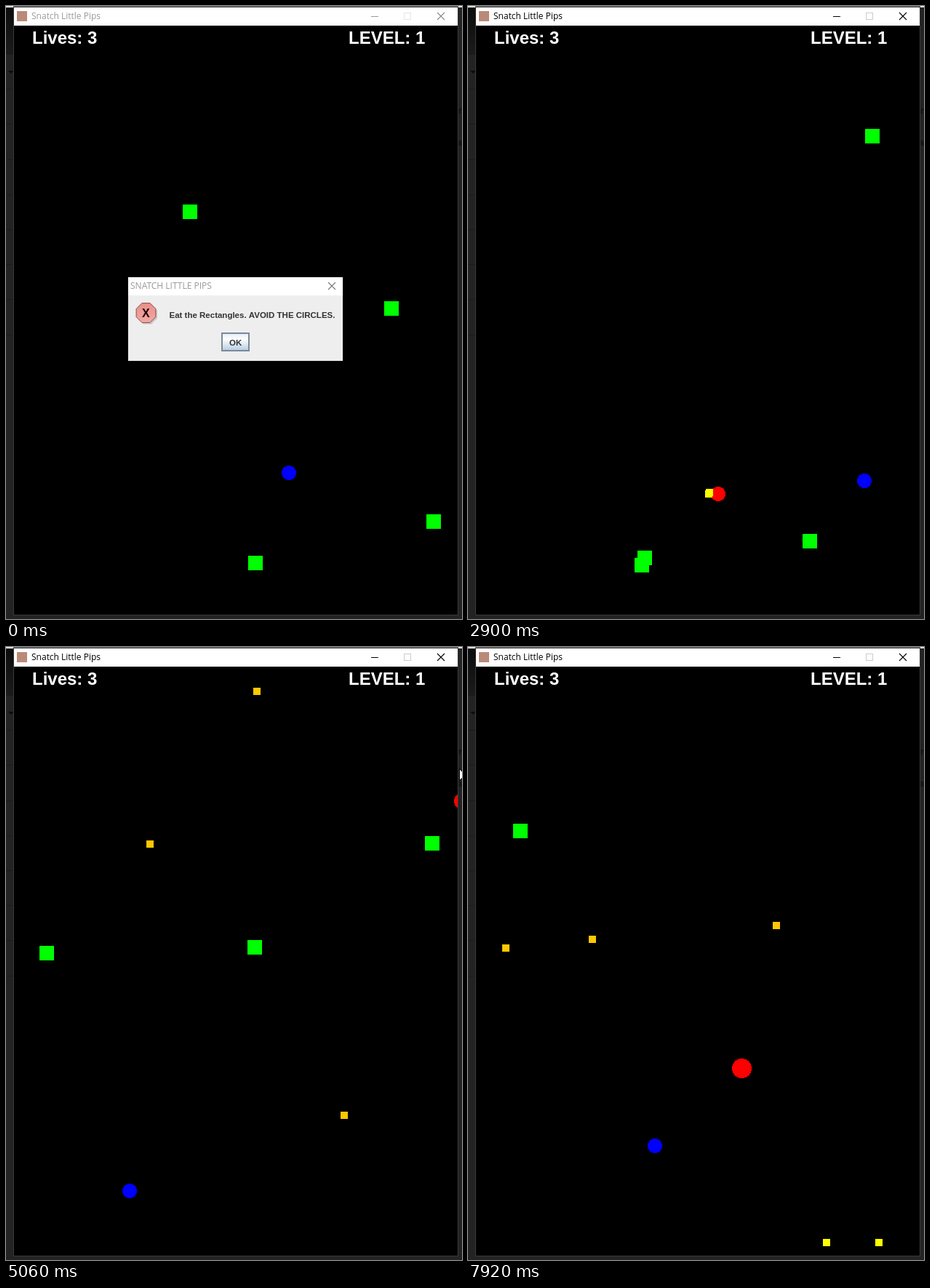
An HTML page with a canvas for the animation above (7990 ms loop, 627x843 px).

```html
<!DOCTYPE html>
<html>
<head>
<meta charset="utf-8">
<title>Snatch Little Pips</title>
<style>
html, body { margin: 0; width: 100%; height: 100%; overflow: hidden; background: #222; }
canvas { display: block; }
</style>
</head>
<body>
<canvas id="stage" width="627" height="843"></canvas>
<script>
const LOOP = 7990, STEP = 77.57, START = 21;
const TITLE = 'Snatch Little Pips';
const UI = '12px "Open Sans", sans-serif';
const BOLD = '"Liberation Sans", Arial, sans-serif';
const stage = document.getElementById('stage').getContext('2d');

// Key poses fall on shared beats; each eaten green bursts into two bits at the player.
const BEATS = [24, 37, 48, 65, 76, 102];
const EATEN = [36, 47, 69, 88];

function keys(poses, first = 0) {
  return poses.map((p, i) => [BEATS[first + i], ...p]);
}
function along(path, n) {
  let i = 0;
  while (i < path.length - 2 && n >= path[i + 1][0]) i++;
  const [a, b] = [path[i], path[i + 1]];
  const u = (n - a[0]) / (b[0] - a[0]);
  return [a[1] + (b[1] - a[1]) * u, a[2] + (b[2] - a[2]) * u];
}
const mod = (a, b) => ((a % b) + b) % b;

// Keeps one heading per axis: a key lying behind is reached by way of the wall ahead.
function unfold(values, lo, hi) {
  const dir = Math.sign(values[1] - values[0]) || 1, period = 2 * (hi - lo);
  let at = values[0];
  return values.map(v => {
    const ahead = goal => mod((goal - at) * dir, period);
    return at += dir * Math.min(ahead(v), ahead(2 * lo - v));
  });
}
function fold(v, lo, hi) {
  const u = mod(v - lo, 2 * (hi - lo));
  return lo + Math.min(u, 2 * (hi - lo) - u);
}
function bouncer(path, r, born = START, end = Infinity) {
  const xs = unfold(path.map(k => k[1]), 11 + r, 621 - r);
  const ys = unfold(path.map(k => k[2]), 27 + r, 837 - r);
  const line = path.map((k, i) => [k[0], xs[i], ys[i]]);
  return {
    r, born,
    alive: n => n >= born && n < end,
    at(n) {
      const [x, y] = along(line, n);
      return [fold(x, 11 + r, 621 - r), fold(y, 27 + r, 837 - r)];
    }
  };
}

const playerPath = keys([[326.5, 481.5], [343.5, 671], [543.5, 406.5], [627, 212], [104.5, 136.5], [376, 579]]);
const player = n => along(playerPath, Math.max(n, BEATS[0]));
const meal = i => [EATEN[i], ...player(EATEN[i])];

const ball = bouncer(keys([[538.5, 387.5], [544.5, 652.5], [397.5, 113.5], [169.5, 747.5], [22.5, 355.5], [256.5, 685.5]]), 10);
const greens = [
  [[354, 495]],
  [[580, 537], [556, 179]],
  [[473, 817], [470, 736], [360, 417], [586, 270]],
  [[275, 498], [243, 759], [227, 717], [342, 413], [147, 197]],
  [[459, 585], [239, 769], [130, 650], [56, 421], [139, 217], [72, 253]]
].map((poses, i) => i < EATEN.length
  ? bouncer([...keys(poses), meal(i)], 10, START, EATEN[i])
  : bouncer(keys(poses), 10));
const bits = [
  [[331, 671], [527, 609], [465, 644], [318, 791]],
  [[332, 669], [577, 727]],
  [[577, 409], [345, 61], [113, 87]],
  [[563, 416], [198, 271], [100, 404], [52, 414]],
  [[522, 493], [424, 383]],
  [[292, 278], [171, 402]],
  [[493, 819]],
  [[565, 819]]
].map((poses, i) => {
  const spawn = meal(i >> 1), first = BEATS.findIndex(b => b > spawn[0]);
  return bouncer([spawn, ...keys(poses, first)], 5, spawn[0], BEATS[first + poses.length - 1] + 10);
});

function rect(c, color, x, y, w, h) {
  c.fillStyle = color;
  c.fillRect(x, y, w, h);
}
function text(c, s, x, y, font, color) {
  c.font = font;
  c.fillStyle = color;
  c.fillText(s, x, y);
}
function square(color, [x, y], r) {
  rect(stage, color, Math.round(x) - r, Math.round(y) - r, 2 * r, 2 * r);
}
// Hard-edged disc, one pixel row at a time.
function disc(color, [x, y], r) {
  const left = Math.round(x - r), top = Math.round(y - r);
  for (let row = 0; row < 2 * r; row++) {
    const inset = Math.round(r - Math.sqrt(r * r - (row + 0.5 - r) ** 2));
    rect(stage, color, left + inset, top + row, 2 * (r - inset), 1);
  }
}
function shape(c, points) {
  c.beginPath();
  points.forEach(p => c.lineTo(...p));
  c.closePath();
}
function cross(c, x, y, color) {
  c.strokeStyle = color;
  c.lineWidth = 1.1;
  c.beginPath();
  c.moveTo(x, y); c.lineTo(x + 10, y + 10);
  c.moveTo(x + 10, y); c.lineTo(x, y + 10);
  c.stroke();
}
function octagon(c, x, y, r) {
  shape(c, Array.from({ length: 8 }, (_, i) => {
    const a = (i + 0.5) * Math.PI / 4;
    return [x + r * Math.cos(a), y + r * Math.sin(a)];
  }));
}
function fade(c, y0, y1, ...colors) {
  const g = c.createLinearGradient(0, y0, 0, y1);
  colors.forEach((color, i) => g.addColorStop(i / (colors.length - 1), color));
  return g;
}

function makeDialog() {
  const cv = document.createElement('canvas');
  cv.width = 297;
  cv.height = 117;
  const c = cv.getContext('2d');
  c.translate(-167, -372);
  rect(c, '#111', 167, 372, 297, 117);
  rect(c, '#eee', 168, 373, 295, 115);
  rect(c, '#fff', 168, 373, 295, 25);
  text(c, TITLE.toUpperCase(), 171, 389, UI, '#999');
  cross(c, 443, 380, '#777');
  c.fillStyle = '#c8c8c8';
  octagon(c, 194.5, 424, 14.5);
  c.fill();
  c.fillStyle = fade(c, 408, 436, '#e88e8a', '#f2aaa5');
  c.strokeStyle = '#8c4b48';
  c.lineWidth = 1;
  octagon(c, 192.5, 422, 14.5);
  c.fill();
  c.stroke();
  text(c, 'X', 187, 427.5, 'bold 16px ' + BOLD, '#200');
  text(c, 'Eat the Rectangles. AVOID THE CIRCLES.', 224.5, 429, 'bold 11.5px ' + BOLD, '#333');
  rect(c, '#7a8a99', 296, 449, 39, 26);
  rect(c, fade(c, 451, 473, '#e6eef6', '#fff', '#dbe6f1', '#b8cfe5'), 298, 451, 35, 22);
  text(c, 'OK', 307, 467, 'bold 11.5px ' + BOLD, '#333');
  return cv;
}
const dialog = makeDialog();

function drawDesktop() {
  rect(stage, '#232323', 0, 0, 627, 843);
  rect(stage, fade(stage, 3, 66, '#0c0c0c', '#1b1b1b'), 0, 3, 10, 63);
  for (let y = 66; y < 460; y += 48.2) rect(stage, '#1b1b1b', 0, Math.round(y), 10, 1);
  stage.fillStyle = '#0c0c0c';
  shape(stage, [[3, 89], [11, 89], [7, 93]]);
  stage.fill();
  text(stage, 'r', 622, 148, 'bold 13px ' + BOLD, '#111');
  text(stage, 'a', 620, 192, 'bold 13px ' + BOLD, '#111');
  rect(stage, '#ddd', 0, 0, 627, 2);
  rect(stage, '#777', 10, 0, 612, 1);
  rect(stage, '#3a3a3a', 10, 1, 612, 837);
  rect(stage, '#000', 11, 27, 610, 810);
}

function drawGame(n) {
  stage.save();
  stage.beginPath();
  stage.rect(11, 27, 610, 810);
  stage.clip();
  if (n < START) {
    for (const p of [[253, 283], [530, 416], [588, 709], [343, 766]]) square('#0f0', p, 10);
    disc('#00f', [388.5, 641.5], 10);
  } else {
    const meals = EATEN.filter(e => n >= e).length;
    for (const g of greens) if (g.alive(n)) square('#0f0', g.at(n), g.r);
    disc('#00f', ball.at(n), ball.r);
    disc('#f00', player(n), 10 + Math.round(meals * meals * 0.44) / 2);
    for (const b of bits) if (b.alive(n)) square(n - b.born < 16 ? '#ff0' : '#ffc800', b.at(n), b.r);
  }
  stage.restore();
  text(stage, 'Lives: 3', 36, 52, 'bold 24px ' + BOLD, '#fff');
  text(stage, 'LEVEL: 1', 471, 52, 'bold 24px ' + BOLD, '#fff');
}

function drawTitleBar(active) {
  const ink = active ? '#000' : '#999';
  rect(stage, '#fff', 11, 2, 610, 25);
  rect(stage, '#b98a78', 15, 7, 14, 14);
  text(stage, TITLE, 35, 18, UI, ink);
  rect(stage, ink, 502, 14, 10, 1);
  stage.strokeStyle = active ? '#ccc' : '#e6e6e6';
  stage.lineWidth = 1;
  stage.strokeRect(547.5, 9.5, 9, 9);
  cross(stage, 593, 9, active ? '#000' : '#888');
}

function drawDialog(n) {
  const p = Math.max(0, (n - START) * 0.3);
  if (p >= 1) return;
  const s = 1 - 0.048 * p, w = 297 * s, h = 117 * s;
  stage.globalAlpha = 1 - p;
  stage.drawImage(dialog, 315.5 - p - w / 2, 430.5 - p - h / 2, w, h);
  stage.globalAlpha = 1;
}

function drawCursor(x, y) {
  stage.save();
  stage.translate(Math.round(x) + 0.5, Math.round(y) + 0.5);
  shape(stage, [[0, 0], [0, 16], [4, 12.5], [7, 18], [9, 17], [6.5, 11.5], [11, 11.5]]);
  stage.fillStyle = '#fff';
  stage.strokeStyle = '#000';
  stage.lineWidth = 1;
  stage.fill();
  stage.stroke();
  stage.restore();
}

function draw(now) {
  const n = Math.max(0, Math.floor((now % LOOP - 6) / STEP));
  drawDesktop();
  drawGame(n);
  drawTitleBar(n >= START);
  drawDialog(n);
  if (n > 0 && n < START) {
    const left = (1 - Math.min(1, (n - 1) / 10)) ** 1.5;
    drawCursor(316 + 156 * left, (n < 13 ? 468 : 467) + 245 * left);
  }
  if (player(n)[0] > 621) drawCursor(623, 167);
}

const begin = performance.now();
function tick() {
  draw(performance.now() - begin);
  requestAnimationFrame(tick);
}
tick();
</script>
</body>
</html>
```
